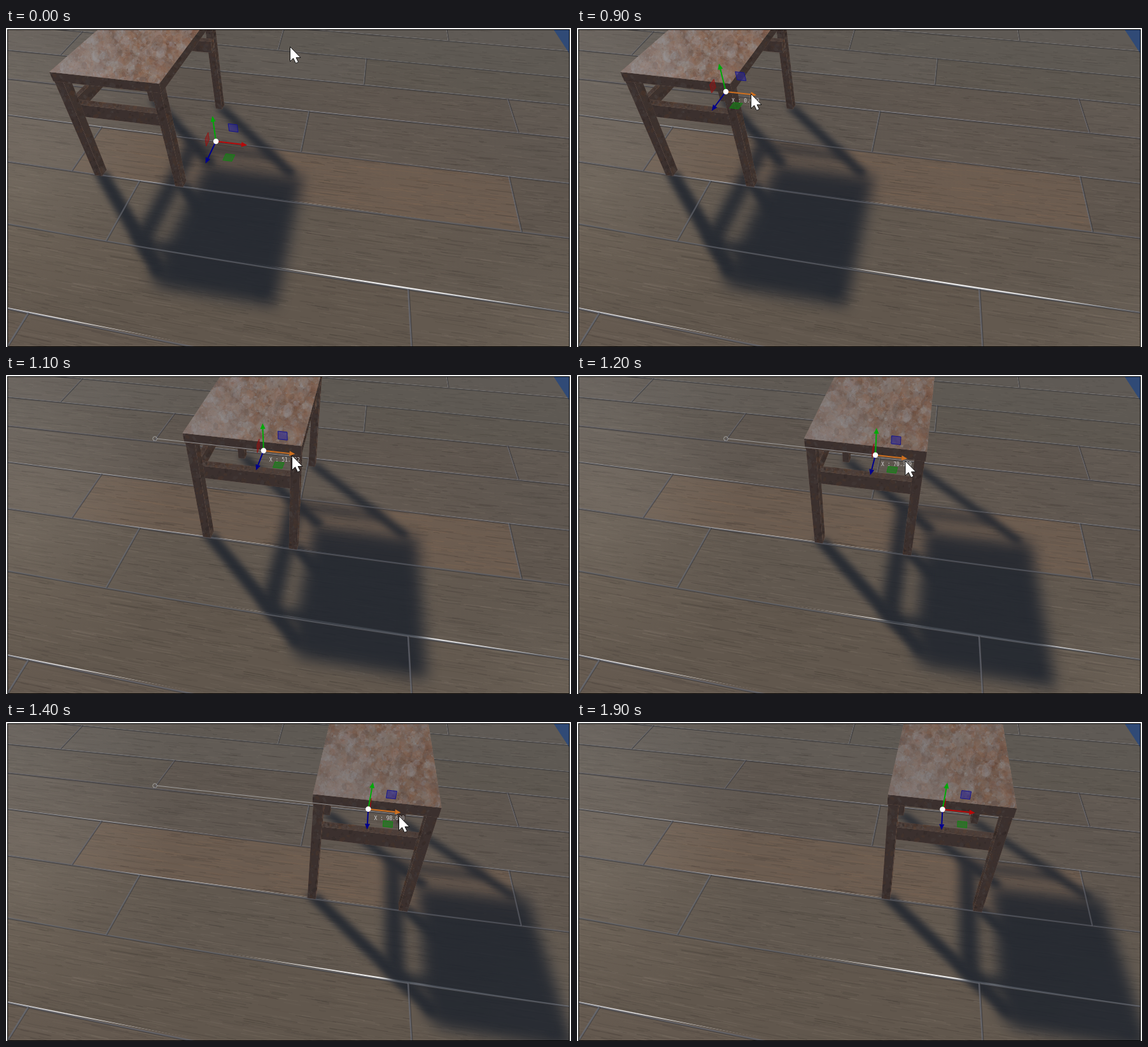
Recreate the animation shown at these times as an HTML page with a canvas. Size 888 px wide and 501 px high, loop 2000 ms.

```html
<!DOCTYPE html>
<html lang="en">
<head>
<meta charset="utf-8">
<title>Moving a stool with a gizmo</title>
<style>
  html, body { margin: 0; width: 100%; height: 100%; overflow: hidden; background: #f4f4f4; }
  canvas { display: block; }
</style>
</head>
<body>
<canvas id="stage" width="888" height="501"></canvas>
<script>
const W = 888, H = 501, LOOP = 2000, STEP = 100;
const ctx = document.getElementById('stage').getContext('2d');

const makeLayer = () => {
  const c = document.createElement('canvas');
  c.width = W; c.height = H;
  return c.getContext('2d');
};
const lerp = (a, b, k) => a + (b - a) * k;
const randomFrom = seed => () => {
  seed = (seed + 0x6D2B79F5) | 0;
  let t = Math.imul(seed ^ seed >>> 15, 1 | seed);
  t = t + Math.imul(t ^ t >>> 7, 61 | t) ^ t;
  return ((t ^ t >>> 14) >>> 0) / 4294967296;
};
const addPolygon = (c, points) => {
  points.forEach(([x, y], i) => i ? c.lineTo(x, y) : c.moveTo(x, y));
  c.closePath();
};
const trace = (c, points) => {
  c.beginPath();
  addPolygon(c, points);
};
const line = (c, x0, y0, x1, y1) => {
  c.beginPath(); c.moveTo(x0, y0); c.lineTo(x1, y1); c.stroke();
};

// Camera: homogeneous screen vectors of the world axes and the stool centre.
const AXIS_X = [3.06, 0.29, -0.0006];
const AXIS_Y = [-41.2, -86.6, -0.0949];
const AXIS_Z = [-72.8, 47.8, -0.121];
const CENTRE = [234, 100, 1];
const LIGHT = { x: 25.8, z: 0.752 };   // shadow shift per unit of height

const project = (x, y, z) => {
  const [a, b, w] = CENTRE.map((c, i) => c + x * AXIS_X[i] + y * AXIS_Y[i] + z * AXIS_Z[i]);
  return [a / w, b / w];
};
const castShadow = (x, y, z) => project(x + LIGHT.x * (y + 1), -1, z + LIGHT.z * (y + 1));

// Floor boards: left and right height of every seam, then the joints of each row.
const SEAMS = [[-70, -2], [-38, 36], [-6, 78], [34, 121], [79, 173], [136, 244],
  [209, 330], [307, 447], [440, 609], [640, 800]];
const JOINTS = [[[689, 695]], [[437, 427]], [[120, 85], [566, 562]], [[265, 232], [788, 805]],
  [[476, 463]], [[150, 103], [790, 810]], [[210, 157]], [[632, 641]], [[35, -75]]];
const seamBulge = row => 1.1 * Math.max(0, row - 3);   // lens curvature
const seamY = (row, x) => {
  const u = x / W;
  return lerp(SEAMS[row][0], SEAMS[row][1], u) + 4 * seamBulge(row) * u * (1 - u);
};

function paintBoard(c, row, left, right, rand) {
  const corner = (r, x) => [x, seamY(r, x)];
  const tone = 5 * (rand() - 0.5);
  const warm = row === 5 && left[0] > 0 && right[0] < W;
  const depth = row / 8;
  const rgb = warm ? [105, 90, 78] : [lerp(94, 99, depth), lerp(89, 88, depth), lerp(84, 78, depth)];
  c.save();
  trace(c, [corner(row, left[0]), corner(row, right[0]), corner(row + 1, right[1]), corner(row + 1, left[1])]);
  c.fillStyle = `rgb(${rgb.map(v => v + tone)})`;
  c.fill();
  c.clip();
  const count = (right[0] - left[0]) * (0.5 + row * 0.15);
  for (let i = 0; i < count; i++) {
    const f = rand(), x = lerp(Math.min(...left), Math.max(...right), rand());
    const length = (8 + 50 * rand() ** 2) * (0.5 + depth);
    const y = p => lerp(seamY(row, p), seamY(row + 1, p), f);
    const dark = rand() < 0.52;
    c.strokeStyle = dark ? `rgba(40,36,34,${0.05 + 0.15 * rand()})`
      : `rgba(${warm ? '165,122,88' : '155,143,130'},${0.04 + 0.12 * rand()})`;
    c.lineWidth = 0.5 + rand() * (0.3 + depth * 0.8);
    c.beginPath();
    c.moveTo(x, y(x));
    c.quadraticCurveTo(x + length / 2, y(x + length / 2) + 3 * (rand() - 0.5), x + length, y(x + length));
    c.stroke();
  }
  c.restore();
}

function glow(c, x, y, radius, color) {
  const g = c.createRadialGradient(x, y, 0, x, y, radius);
  g.addColorStop(0, `rgba(${color})`);
  g.addColorStop(1, `rgba(${color.replace(/[^,]+$/, '0')})`);
  c.fillStyle = g;
  c.fillRect(0, 0, W, H);
}

function paintSeams(c) {
  const stroke = (row, path) => {
    for (const [offset, color] of [[1, 'rgba(48,48,51,.6)'],
      [0, `rgba(110,112,122,${0.14 + row * 0.06})`]]) {
      c.strokeStyle = color;
      c.lineWidth = 1.1 + row * 0.18;
      c.beginPath();
      path(offset);
      c.stroke();
    }
  };
  SEAMS.forEach(([l, r], row) => stroke(row, dy => {
    c.moveTo(0, l + dy);
    c.quadraticCurveTo(W / 2, (l + r) / 2 + 2 * seamBulge(row) + dy, W, r + dy);
  }));
  JOINTS.forEach((row, i) => row.forEach(([a, b]) => stroke(i + 1, dx => {
    c.moveTo(a + dx, seamY(i, a));
    c.lineTo(b + dx, seamY(i + 1, b));
  })));
}

const floor = makeLayer();
(function buildFloor() {
  const rand = randomFrom(11);
  JOINTS.forEach((joints, row) => {
    const cuts = [[-90, -90], ...joints, [W + 20, W + 20]];
    for (let i = 0; i + 1 < cuts.length; i++) paintBoard(floor, row, cuts[i], cuts[i + 1], rand);
  });
  glow(floor, 20, 60, 260, '150,147,142,.22');
  glow(floor, 20, 250, 240, '155,143,128,.24');
  glow(floor, 880, 480, 160, '150,140,125,.12');
  glow(floor, 620, 250, 220, '130,102,80,.07');
  trace(floor, [[859, 0], [W, 0], [W, 44]]);
  floor.fillStyle = '#304a76';
  floor.fill();
})();

// Stool parts, back to front; box is [x0, x1, y0, y1, z0, z1], blur softens its shadow.
const LEG = 19.4, LEG_Z = 0.93;
const leg = (sx, sz) => ({
  box: [sx * LEG - 1.8, sx * LEG + 1.8, -1, 0.85, sz * LEG_Z - 0.065, sz * LEG_Z + 0.065], blur: 5
});
const brace = z => ({ box: [-LEG, LEG, 0.25, 0.47, z - 0.05, z + 0.05], blur: 8 });
const STOOL = [
  leg(-1, -1), leg(1, -1), brace(-LEG_Z),
  { box: [-LEG - 1, -LEG + 1, 0.25, 0.47, -LEG_Z, LEG_Z], blur: 8 },
  brace(LEG_Z), leg(-1, 1), leg(1, 1),
  { box: [-21.5, 21.5, 0.85, 1, -1, 1], blur: 11 }
];
// Corner bits: 1 = x, 2 = y, 4 = z; shade is the darkness of the side.
const SIDES = [
  { corners: [0, 4, 6, 2], shade: 0.5 },
  { corners: [5, 1, 3, 7], shade: 0.5 },
  { corners: [4, 5, 7, 6], shade: 0.52 },
  { corners: [6, 7, 3, 2], shade: 0.3 }
];
const SEAT_RUST = ['#a5a3a5', '#8d6147', '#6f4c3c', '#94867f', '#9c7059', '#5f4a42', '#98969a'];
const FRAME_RUST = ['#8d8078', '#7d5439', '#4a3226', '#6f6866', '#8b5c3f', '#3d302b', '#5c4c44'];

const boxSides = (box, shift, view) => SIDES.map(({ corners, shade }) => ({
  shade,
  points: corners.map(i => view(box[i & 1] + shift, box[2 + (i >> 1 & 1)], box[4 + (i >> 2)]))
}));
const facesCamera = p => p.reduce((sum, [x, y], i) => {
  const [u, v] = p[(i + 1) % 4];
  return sum + x * v - u * y;
}, 0) < 0;

const shadow = makeLayer();
function drawShadow(shift) {
  shadow.clearRect(0, 0, W, H);
  shadow.fillStyle = '#1d232d';
  for (const { box, blur } of STOOL) {
    shadow.filter = `blur(${blur}px)`;
    shadow.beginPath();
    for (const { points } of boxSides(box, shift, castShadow)) {
      // One winding for all sides, so that they fill as a union.
      addPolygon(shadow, facesCamera(points) ? points : points.reverse());
    }
    shadow.fill();
  }
  ctx.globalAlpha = 0.83;
  ctx.drawImage(shadow.canvas, 0, 0);
  ctx.globalAlpha = 1;
}

function paintRust([a, b, c, d], colors, count, maxRadius, seed) {
  const rand = randomFrom(seed);
  for (let i = 0; i < count; i++) {
    const u = rand(), v = rand();
    const at = k => lerp(lerp(a[k], b[k], u), lerp(d[k], c[k], u), v);
    const radius = 0.5 + maxRadius * rand() ** 5;
    ctx.globalAlpha = (0.2 + 0.35 * rand()) / (1 + radius * 0.15);
    ctx.fillStyle = colors[Math.floor(rand() * colors.length)];
    ctx.beginPath();
    ctx.ellipse(at(0), at(1), radius * 1.6, radius, rand() * 3, 0, 7);
    ctx.fill();
  }
  ctx.globalAlpha = 1;
}

function drawStool(shift) {
  STOOL.forEach(({ box }, part) => {
    const isSeat = part === STOOL.length - 1;
    boxSides(box, shift, project).forEach(({ points, shade }, side) => {
      if (!facesCamera(points)) return;
      const isTop = isSeat && side === 3;
      ctx.save();
      trace(ctx, points);
      ctx.fillStyle = isTop ? '#877267' : '#645047';
      ctx.fill();
      ctx.clip();
      if (isTop) {
        paintRust(points, SEAT_RUST, 2600, 8, 1);
        glow(ctx, points[0][0] + 40, points[0][1] - 15, 100, '165,170,178,.35');
      } else {
        paintRust(points, FRAME_RUST, 150, 3, part * 10 + side + 1);
      }
      ctx.fillStyle = `rgba(22,20,23,${isTop ? 0.04 + shift * 0.0012 : shade})`;
      trace(ctx, points);
      ctx.fill();
      ctx.restore();
    });
  });
}

function drawGizmo(origin, active) {
  const [ox, oy] = origin;
  const arm = (axis, size) => [0, 1].map(k => (axis[k] - origin[k] * axis[2]) * size);
  const x = arm(AXIS_X, 15), y = arm(AXIS_Y, 0.57), z = arm(AXIS_Z, 0.5);
  const plane = (p, q, fill, edge) => {
    trace(ctx, [[.48, .48], [.77, .48], [.77, .77], [.48, .77]]
      .map(([m, n]) => [ox + p[0] * m + q[0] * n, oy + p[1] * m + q[1] * n]));
    ctx.fillStyle = fill; ctx.fill();
    ctx.strokeStyle = edge; ctx.lineWidth = 1; ctx.stroke();
  };
  const arrow = ([dx, dy], color) => {
    const length = Math.hypot(dx, dy), ux = dx / length, uy = dy / length;
    const tx = ox + dx, ty = oy + dy, bx = tx - ux * 9, by = ty - uy * 9;
    ctx.strokeStyle = ctx.fillStyle = color;
    ctx.lineWidth = 2;
    line(ctx, ox, oy, bx, by);
    trace(ctx, [[tx, ty], [bx - uy * 4, by + ux * 4], [bx + uy * 4, by - ux * 4]]);
    ctx.fill();
  };
  plane(y, z, 'rgba(150,20,20,.5)', 'rgba(150,15,15,.8)');
  plane(x, y, 'rgba(45,40,150,.6)', '#15158c');
  plane(x, z, 'rgba(25,125,25,.65)', 'rgba(15,135,15,.85)');
  arrow(z, '#00008c');
  arrow(y, '#00a908');
  arrow(x, active ? '#cf701f' : '#b80808');
  ctx.fillStyle = '#fff';
  ctx.beginPath(); ctx.arc(ox, oy, 4.2, 0, 7); ctx.fill();
}

function drawDragGuide([x, y], distance) {
  const [sx, sy] = CENTRE;
  if (distance > 0) {
    ctx.strokeStyle = 'rgba(185,185,185,.75)';
    ctx.lineWidth = 1;
    line(ctx, sx + 3, sy, x, y);
    ctx.beginPath(); ctx.arc(sx, sy, 3.3, 0, 7); ctx.stroke();
  }
  ctx.font = '8px "DejaVu Sans Mono", monospace';
  ctx.fillStyle = '#d0d0d0';
  ctx.fillText('X : ' + distance.toFixed(3), x + 9, y + 17);
}

function drawCursor([x, y]) {
  trace(ctx, [[0, 0], [0, 23], [5, 18], [9, 26], [13, 24], [9.5, 17], [16.5, 17]]
    .map(([dx, dy]) => [x + dx + 0.5, y + dy + 0.5]));
  ctx.fillStyle = '#fff'; ctx.fill();
  ctx.strokeStyle = '#111'; ctx.lineWidth = 1; ctx.stroke();
}

// Keys are [time, ...values], linear in between.
function sample(keys, t) {
  const next = keys.findIndex(k => k[0] > t);
  if (next < 0) return keys[keys.length - 1].slice(1);
  const a = keys[next - 1], b = keys[next], k = (t - a[0]) / (b[0] - a[0]);
  return a.slice(1).map((v, i) => lerp(v, b[i + 1], k));
}
const DRAG = [[0, 0], [900, 0], [1100, 51.732], [1300, 88.926], [1400, 98.6], [1500, 100]];
const POINTER = [[0, 446, 29], [100, 446, 29], [400, 273, 103], [900, 273, 103], [1100, 449, 126],
  [1300, 582, 143], [1400, 617, 147], [1600, 730, 96]];
const PIVOT_MOVED = 200, HOVER = 400, PRESS = 900, RELEASE = 1500, POINTER_GONE = 1800;

function draw(t) {
  const [shift] = sample(DRAG, t);
  const origin = t < PIVOT_MOVED ? [330, 178] : project(shift, 0, 0);
  ctx.fillStyle = '#f4f4f4';
  ctx.fillRect(0, 0, W, H);
  ctx.save();
  ctx.beginPath(); ctx.rect(2, 2, 884, 499); ctx.clip();
  ctx.drawImage(floor.canvas, 0, 0);
  drawShadow(shift);
  paintSeams(ctx);
  drawStool(shift);
  if (t >= PRESS && t < RELEASE) drawDragGuide(origin, shift);
  drawGizmo(origin, t >= HOVER && t < RELEASE);
  if (t < POINTER_GONE) drawCursor(sample(POINTER, t));
  ctx.restore();
  ctx.strokeStyle = '#000';
  ctx.lineWidth = 1;
  ctx.strokeRect(2.5, 2.5, 883, 498);
}

let shown = -1;
function tick() {
  const t = Math.floor(performance.now() % LOOP / STEP) * STEP;
  if (t !== shown) draw(shown = t);
  requestAnimationFrame(tick);
}
tick();
</script>
</body>
</html>
```
